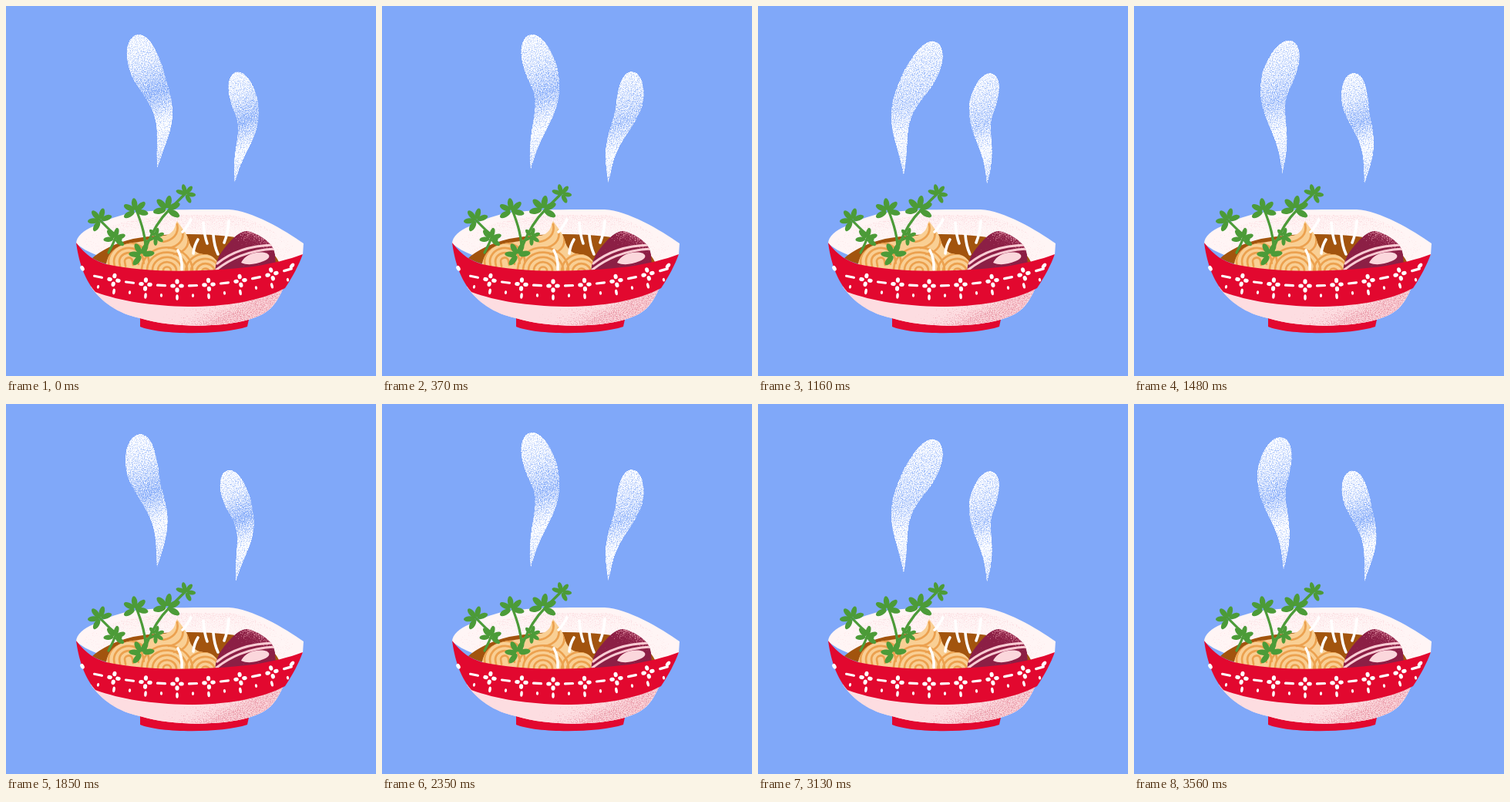
An HTML page for the animation above (3.68 s loop, 480 by 480 pixels).

```html
<!DOCTYPE html>
<html lang="en">
<head>
<meta charset="utf-8">
<title>Noodle bowl</title>
<style>
html, body { margin: 0; width: 100%; height: 100%; overflow: hidden; background: #80a8f9; }
svg { display: block; width: 100%; height: 100%; }
</style>
</head>
<body>
<svg viewBox="0 0 480 480" fill="none" stroke-linecap="round" stroke-linejoin="round">
  <defs id="defs">
    <linearGradient id="rim" x1="0" y1="0" x2="0" y2="1">
      <stop offset="0" stop-opacity=".6"/>
      <stop offset=".5" stop-opacity=".36"/>
      <stop offset="1" stop-opacity=".5"/>
    </linearGradient>
    <linearGradient id="under" gradientUnits="userSpaceOnUse" x1="238" y1="384" x2="254" y2="418">
      <stop offset="0" stop-opacity=".2"/>
      <stop offset="1" stop-opacity=".66"/>
    </linearGradient>
    <linearGradient id="skin" gradientUnits="userSpaceOnUse" x1="302" y1="322" x2="314" y2="290">
      <stop offset=".3" stop-opacity=".25"/>
      <stop offset="1" stop-opacity=".72"/>
    </linearGradient>
    <clipPath id="mound"><path d="M130 334C133 320 142 312 155 309C165 306 175 307 184 303C194 296 207 301 214 294C220 290 219 283 222 279C228 288 235 295 237 304C240 314 245 321 256 322C268 322 276 329 280 348H130Z"/></clipPath>
    <clipPath id="meat"><path id="cut" d="M271 346C271 329 280 317 290 306C298 297 306 291 314 292C326 295 340 303 346 313C349 319 350 324 350 340Z"/></clipPath>
  </defs>

  <rect width="480" height="480" fill="#80a8f9"/>
  <g id="steam" filter="url(#mist)"></g>

  <path fill="#fff5f5" d="M91 308C91 299 101 291 113 286C130 277 148 271 166 268C205 263 250 264 289 264C318 265 362 291 386 308L385 323C330 350 140 352 91 308Z"/>
  <path fill="url(#rim)" filter="url(#blush)" d="M99 307C122 283 165 274 225 271H290C316 273 350 292 374 310C370 320 358 327 350 332C280 345 140 342 99 307Z"/>
  <path fill="#a2540e" d="M112 327C122 318 142 307 165 302C200 295 250 294 290 299C320 302 345 312 354 332C320 350 150 352 112 327Z"/>
  <g clip-path="url(#mound)">
    <path fill="#f9cf94" d="M125 275H285V350H125Z"/>
    <g id="noodles" stroke="#eca14f" stroke-width="2.7"></g>
  </g>
  <path stroke="#fff" stroke-width="3.6" d="M240 277Q235 287 229 293M256 281Q257 297 261 308M269 297Q270 311 275 322M289 279Q288 295 283 307M249 303Q244 311 243 321M223 317Q229 328 228 342"/>

  <g clip-path="url(#meat)">
    <use href="#cut" fill="#8c1f45"/>
    <use href="#cut" fill="url(#skin)" filter="url(#rose)"/>
    <path stroke="#f9cbd3" stroke-width="3.2" d="M274 334C290 321 311 311 346 310M273 342C290 329 312 317 349 315"/>
    <path fill="#fbd7dc" d="M305 333C310 323 322 318 336 320C344 322 343 328 334 331C324 335 314 337 305 333Z"/>
  </g>

  <path fill="#e2082f" d="M174 400V416C200 427 280 427 313 416L316 402Z"/>
  <path id="base" fill="#fddde1" d="M110 364C124 384 145 399 174 405C215 418 280 417 314 407C338 400 350 392 362 360Z"/>
  <use href="#base" fill="none"/>
  <path fill="url(#under)" filter="url(#shade)" d="M110 364C124 384 145 399 174 405C215 418 280 417 314 407C338 400 350 392 362 360Z"/>
  <path fill="#e2082f" d="M91 307C104 324 116 331 130 335C180 346 250 346 321 338C345 334 367 329 385 322C380 336 372 351 362 366C330 383 285 390 236 390C190 389 148 383 116 371C104 357 95 337 91 307Z"/>
  <g id="pattern" stroke="#fff" stroke-width="3.2"></g>
  <g id="herb" stroke="#4c9b38" stroke-width="3.2">
    <path d="M181 322C182 300 176 282 168 262M183 310C190 292 200 276 212 264L235 241M149 303Q134 291 121 277M133 320Q139 309 143 298M181 306Q190 302 198 298"/>
  </g>
</svg>
<script>
const LOOP = 3680, CYCLE = 1980, STEP = 60;
const $ = id => document.getElementById(id);
const rad = deg => deg * Math.PI / 180;
const wave = deg => Math.cos(rad(deg));

function add(parent, tag, attrs) {
  const el = document.createElementNS("http://www.w3.org/2000/svg", tag);
  for (const k in attrs) el.setAttribute(k, attrs[k]);
  parent.append(el);
  return el;
}

// Stippling: source opacity decides how much of the noise shows.
function grain(id, color, gain) {
  const f = add($("defs"), "filter", {
    id, filterUnits: "userSpaceOnUse", x: 0, y: 0, width: 480, height: 480,
    "color-interpolation-filters": "sRGB"
  });
  // White premultiplied noise, so alpha alone carries the pattern.
  add(f, "feTurbulence", { type: "fractalNoise", baseFrequency: .73, numOctaves: 2, seed: 4 });
  add(f, "feColorMatrix", { values: "0 0 0 0 1 0 0 0 0 1 0 0 0 0 1 0 0 0 1 0", result: "noise" });
  add(f, "feComposite", { in: "SourceAlpha", in2: "noise", operator: "arithmetic", k1: 0, k2: gain, k3: gain, k4: -gain, result: "dots" });
  add(f, "feFlood", { "flood-color": color });
  add(f, "feComposite", { in2: "dots", operator: "in" });
}
grain("mist", "#fff", 2.2);
grain("blush", "#f9cbd2", 2);
grain("shade", "#e58a9b", 2.2);
grain("rose", "#dc8ba0", 3);

// Noodles: nested arches
function arches(cx, cy, count, tilt) {
  for (let i = 0; i < count; i++) {
    const r = 5 + 7 * i;
    add($("noodles"), "path", {
      d: `M${-r} 6V0A${r} ${r * .9} 0 0 1 ${r} 0V6`,
      transform: `translate(${cx} ${cy}) rotate(${tilt})`
    });
  }
}
arches(159, 331, 4, -10);
arches(209, 343, 5, 4);
arches(259, 345, 4, 8);
for (let i = 0; i < 3; i++)
  add($("noodles"), "path", { d: "M222 283C225 296 216 304 204 306", transform: `translate(${i * 7} ${i * 8})` });

// Floral band: flowers at even spacing with a dash between each pair
const bandY = x => 363 - (x - 225) ** 2 / 950;
const dot = (x, y, rx, ry, turn) => add($("pattern"), "ellipse", {
  cx: x, cy: y, rx, ry, fill: "#fff", stroke: "none", transform: `rotate(${turn} ${x} ${y})`
});
for (let x = 99; x < 380; x += 20.5) {
  const y = bandY(x), lean = (222 - x) / 9;
  const flower = Math.round((x - 99) / 20.5) % 2 === 0;
  if (!flower) {
    add($("pattern"), "path", { d: `M${x - 5} ${y}H${x + 5}`, transform: `rotate(${lean} ${x} ${y})` });
    dot(x, y + 13, 1.6, 2.4, lean);
  } else if (x > 110) {
    for (let a = lean; a < lean + 360; a += 90)
      dot(x + 5.5 * wave(a), y + 5.5 * Math.sin(rad(a)), 3.3, 2.6, a);
    dot(x, y + 15, 1.8, 3.8, lean);
  } else {
    dot(x, y - 6, 2.4, 3.6, -30);
  }
}
dot(371, 337, 2.4, 4, 40);

// Herb leaves: a fan of five lobes
function leaf(x, y, turn, size) {
  const g = add($("herb"), "g", { transform: `translate(${x} ${y}) rotate(${turn}) scale(${size})` });
  for (let a = -110; a <= 110; a += 55)
    add(g, "ellipse", { cy: -8, rx: 3.2, ry: 6.6, fill: "#4c9b38", stroke: "none", transform: `rotate(${a})` });
}
leaf(122, 278, -40, 1.1);
leaf(141, 302, 15, 1);
leaf(168, 266, -8, 1.15);
leaf(209, 264, 10, 1.25);
leaf(233, 244, 40, .9);
leaf(194, 299, 70, .8);
leaf(176, 323, -30, 1.15);

// Steam: a sway that travels down each plume, fading towards the tail.
const plumes = [
  { x: 203, top: 41, tail: 217, girth: 21, sway: 1, bob: 5, lag: 0 },
  { x: 307, top: 86, tail: 232, girth: 17.5, sway: .74, bob: 1, lag: 66 }
];
const smooth = s => s * s * (3 - 2 * s);
const breadth = s => s < .28
  ? Math.sqrt(1 - (1 - s / .28) ** 2.6)
  : ((1 - s) / .72) ** .95;

plumes.forEach((p, i) => {
  const grad = add($("defs"), "linearGradient", { id: "fade" + i, x1: 0, y1: 0, x2: .12, y2: 1 });
  const stops = [.95, .85, .68, .95, .8].map((o, k) =>
    add(grad, "stop", { offset: k / 4, "stop-color": "#fff", "stop-opacity": o }));
  p.waist = stops[2];
  p.path = add($("steam"), "path", { fill: `url(#fade${i})` });
});

function spine(p, s, angle) {
  const reach = p.sway * (4 + 29 * (1 - s) ** 1.3);
  const top = p.top + p.bob * wave(angle - 215);
  const tail = p.tail + p.bob * wave(angle - 190);
  return [
    p.x - 11 * s + reach * wave(angle + p.lag - 170 + 182 * smooth(s)),
    top + s * (tail - top)
  ];
}

function draw(angle) {
  for (const p of plumes) {
    const left = [], right = [];
    for (let j = 0; j <= 60; j++) {
      const s = (j / 60) ** 1.5;
      const [x, y] = spine(p, s, angle);
      const [x0, y0] = spine(p, Math.max(0, s - .02), angle);
      const [x1, y1] = spine(p, Math.min(1, s + .02), angle);
      const w = p.girth * breadth(s) / Math.hypot(x1 - x0, y1 - y0);
      const nx = (y1 - y0) * w, ny = (x0 - x1) * w;
      left.push(`${(x - nx).toFixed(2)} ${(y - ny).toFixed(2)}`);
      right.unshift(`${(x + nx).toFixed(2)} ${(y + ny).toFixed(2)}`);
    }
    p.path.setAttribute("d", "M" + left.concat(right).join("L") + "Z");
    p.waist.setAttribute("stop-opacity", .7 - .08 * wave(angle + p.lag / 2));
  }
}

const start = performance.now();
function tick() {
  const t = (performance.now() - start) % LOOP;
  draw(Math.floor(t / STEP) * STEP / CYCLE * 360);
  requestAnimationFrame(tick);
}
tick();
</script>
</body>
</html>
```
